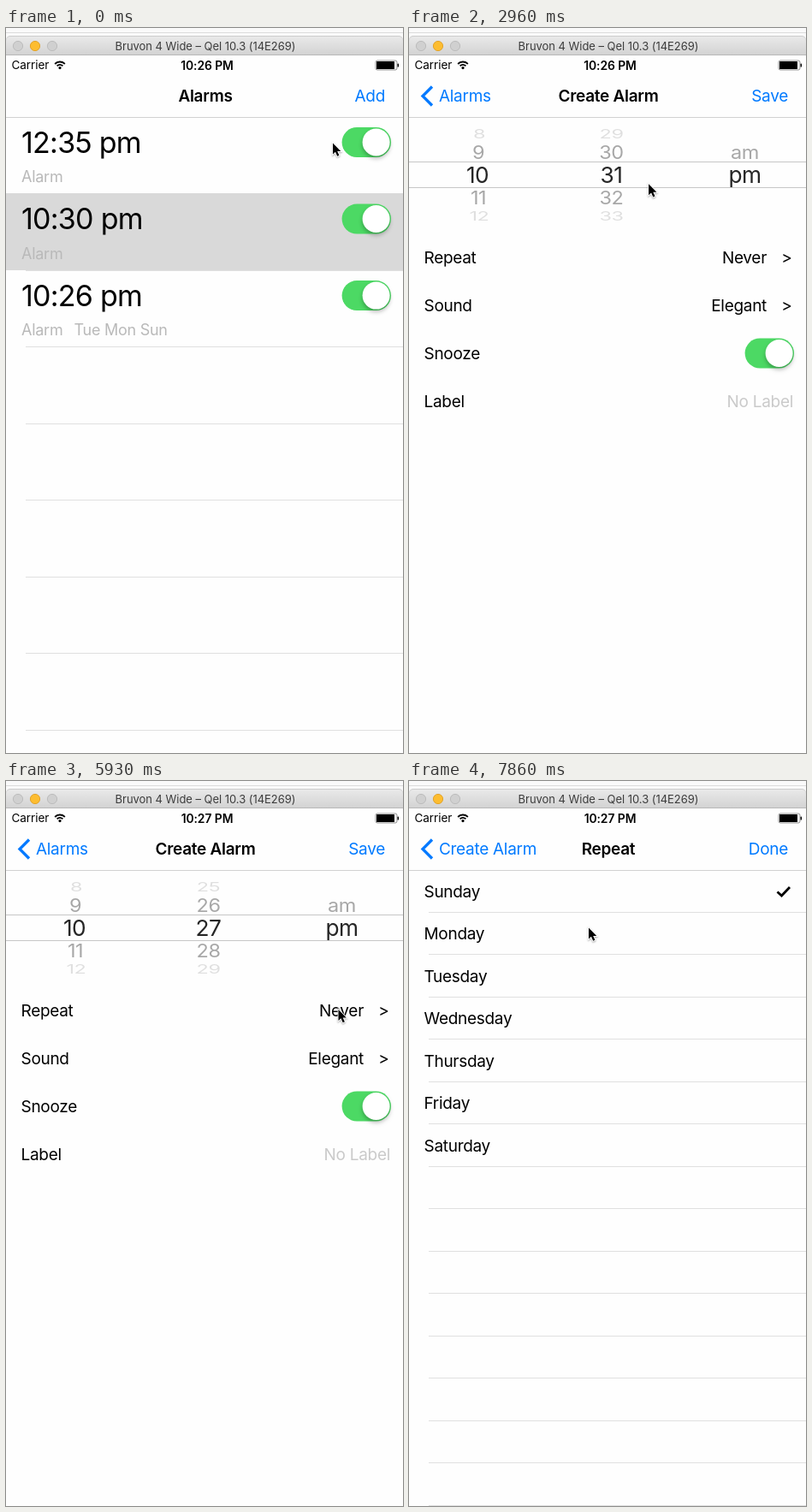
Recreate the animation shown at these times as an HTML page with a canvas. Size 464 px wide and 847 px high, loop 8 s.

```html
<!DOCTYPE html>
<html lang="en">
<head>
<meta charset="utf-8">
<title>Alarms</title>
<style>
html, body { margin: 0; width: 100%; height: 100%; overflow: hidden; background: #fefefe; }
canvas { display: block; width: 464px; height: 847px; }
</style>
</head>
<body>
<canvas id="stage"></canvas>
<script>
const W = 464, H = 847, LOOP = 8000, STEP = 148.2, LAST = 53;
const TOP = 104, BLUE = '#007aff', PAPER = '#fefefe', LINE = '#e0e0e0', PRESSED = '#d9d9d9';
const PUSH_FORM = 1895, PUSH_DAYS = 6334, NAV_MS = 350, PUSH_MS = 450;
const DRAG_START = 3265, DRAG_END = 4550, GRAB_Y = 200.3;
const PRESS_ADD = 1625, PRESS_DAY = 7400, CHECK_DAY = 7550;
const DAYS = ['Sunday', 'Monday', 'Tuesday', 'Wednesday', 'Thursday', 'Friday', 'Saturday'];
const NAV = {
  list: { title: 'Alarms', right: 'Add' },
  form: { title: 'Create Alarm', back: 'Alarms', right: 'Save' },
  days: { title: 'Repeat', back: 'Create Alarm', right: 'Done' }
};
// pointer path: time, x, y
const PATH = [
  [0, 381.5, 134], [600, 381.5, 134], [740, 378, 132], [1040, 378, 132], [1630, 427, 88],
  [2225, 427, 88], [3110, 250.5, GRAB_Y], [DRAG_START, 250.5, GRAB_Y], [4001, 250.5, 275],
  [4300, 250.5, 316], [DRAG_END, 250.5, 316], [5300, 413, 270],
  [5640, 391, 254], [5928, 388, 266.5], [6800, 388, 266.5], [7270, 212, 126],
  [7450, 212, 126], [7854, 209.5, 171]
];

const canvas = document.getElementById('stage');
const ctx = canvas.getContext('2d');
const dpr = window.devicePixelRatio || 1;
canvas.width = W * dpr;
canvas.height = H * dpr;

const clamp = (v, a = 0, b = 1) => Math.min(b, Math.max(a, v));

function group(draw) {
  ctx.save();
  draw();
  ctx.restore();
}

function rect(x, y, w, h, color) {
  ctx.fillStyle = color;
  ctx.fillRect(x, y, w, h);
}

function rounded(x, y, w, h, r, color) {
  ctx.beginPath();
  ctx.roundRect(x, y, w, h, r);
  ctx.fillStyle = color;
  ctx.fill();
}

function disc(x, y, r, color, edge) {
  ctx.beginPath();
  ctx.arc(x, y, r, 0, 7);
  ctx.fillStyle = color;
  ctx.fill();
  if (edge) {
    ctx.strokeStyle = edge;
    ctx.lineWidth = 1;
    ctx.stroke();
  }
}

function stroke(points, width, color) {
  ctx.beginPath();
  for (const [x, y] of points) ctx.lineTo(x, y);
  ctx.lineWidth = width;
  ctx.strokeStyle = color;
  ctx.stroke();
}

// text centred on its cap height at y; tracking tightens as the size grows
function text(str, x, y, { size = 19, color = '#000', weight = 400, align = 'left', alpha = 1 } = {}) {
  if (alpha <= 0) return;
  const track = -0.0223 + 0.185 * Math.exp(-0.1745 * size);
  ctx.font = `${weight} ${size}px Inter, Roboto, sans-serif`;
  ctx.letterSpacing = `${(track * size).toFixed(3)}px`;
  ctx.textAlign = align;
  ctx.fillStyle = color;
  ctx.globalAlpha = alpha;
  ctx.fillText(str, x, y + size * 0.364);
  ctx.globalAlpha = 1;
}

function toggle(y) {
  rounded(392.6, y - 17.5, 57.4, 35, 17.5, '#4cd964');
  group(() => {
    ctx.shadowColor = 'rgba(0,0,0,.28)';
    ctx.shadowBlur = 5 * dpr;
    ctx.shadowOffsetY = 3 * dpr;
    disc(432.6, y, 16, '#fff');
  });
}

function listScreen() {
  const pitch = 89.55;
  const alarms = ['12:35 pm', '10:30 pm', '10:26 pm'];
  rect(0, TOP, W, H, PAPER);
  for (let i = 1; i <= 8; i++) rect(23, Math.round(TOP - 0.4 + i * pitch), W, 1, LINE);
  rect(0, 193, W, 90, PRESSED);
  alarms.forEach((label, i) => {
    const y = TOP + i * pitch;
    text(label, 18, y + 29.5, { size: 34 });
    text('Alarm', 18, y + 69.5, { size: 18, color: '#b9b9b9' });
    toggle(y + 29.5);
  });
  text('Tue Mon Sun', 79.5, TOP + 2 * pitch + 69.5, { size: 18, color: '#b9b9b9' });
}

// one column of the picker drum
function wheel(x, value, label, size, color, fade, nudge) {
  const radius = 62.7, angle = 25 * Math.PI / 180;
  for (let n = Math.ceil(value - 2.6); n <= value + 2.6; n++) {
    const str = label(n), a = (n - value) * angle;
    if (!str) continue;
    const c = Math.cos(a);
    group(() => {
      ctx.translate(x + nudge * Math.abs(n - value), 171.5 + radius * Math.sin(a));
      ctx.scale(1, c);
      text(str, 0, 0, { size, color, align: 'center', alpha: fade ? 0.46 * c ** 3 : 1 });
    });
  }
}

function picker(minute) {
  const hours = n => String((n + 11) % 12 + 1);
  const minutes = n => String((n + 60) % 60).padStart(2, '0');
  const half = n => ['am', 'pm'][n];
  const bands = [[110, 46, 23.5, '#000', true], [157, 29, 26.3, '#262626', false], [187, 45, 23.5, '#000', true]];
  for (const [y, h, size, color, fade] of bands) group(() => {
    ctx.beginPath();
    ctx.rect(0, y, W, h);
    ctx.clip();
    wheel(80, 10, hours, size, color, fade, 1);
    wheel(236.5, minute, minutes, size, color, fade, 0);
    wheel(392.5, 1, half, size, color, fade, 0);
  });
  rect(0, 156, W, 1, '#c6c6c6');
  rect(0, 186, W, 1, '#c6c6c6');
}

function formScreen(t) {
  rect(0, TOP, W, H, PAPER);
  const held = 31 - (pointer(t)[1] - GRAB_Y) / 27.4;
  picker(t < DRAG_START ? 31 : t < DRAG_END ? held : 27);
  ['Repeat', 'Sound', 'Snooze', 'Label'].forEach((s, i) => text(s, 17.5, 268 + i * 56));
  ['Never', 'Elegant'].forEach((s, i) => {
    text(s, 418, 268 + i * 56, { align: 'right' });
    text('>', 447.5, 268 + i * 56, { align: 'right' });
  });
  toggle(380);
  text('No Label', 449, 436, { align: 'right', color: '#cacaca' });
}

function daysScreen(t) {
  const pitch = 49.5;
  rect(0, TOP, W, H, PAPER);
  if (t > PRESS_DAY && t < CHECK_DAY) rect(0, TOP, W, pitch, PRESSED);
  for (let i = 1; i <= 15; i++) rect(23, Math.floor(TOP - 0.1 + i * pitch), W, 1, LINE);
  DAYS.forEach((s, i) => text(s, 17.5, 129 + i * pitch));
  if (t >= CHECK_DAY) stroke([[430.5, 129.5], [435.5, 134], [445, 124]], 2.8, '#000');
}

function chevron(alpha) {
  ctx.globalAlpha = alpha;
  stroke([[27, 68.5], [16, 79.5], [27, 90.5]], 3.3, BLUE);
  ctx.globalAlpha = 1;
}

const navTitle = (s, x, alpha) => text(s, x, 79.5, { weight: 600, align: 'center', alpha });
const navBack = (s, x, alpha) => s && text(s, x, 79.5, { color: BLUE, alpha });
const navRight = (s, alpha) => text(s, 443, 79.5, { color: BLUE, align: 'right', alpha });

function navBar(from, to, u, t) {
  rect(0, 32, W, TOP - 32, PAPER);
  rect(0, TOP, W, 1, '#d2d2d2');
  const dimAdd = from === NAV.list && t >= PRESS_ADD ? 0.24 : 1;
  if (!to) {
    if (from.back) chevron(1);
    navBack(from.back, 35, 1);
    navTitle(from.title, 233, 1);
    navRight(from.right, dimAdd);
    return;
  }
  const rest = (1 - u) ** 2, gone = 1 - 2.6 * u, come = clamp((u - 0.15) * 2.2);
  chevron(from.back ? 1 : 0.7 * u);
  navBack(from.back, 35 - 100 * u, gone);
  navTitle(from.title, 233 - 168 * u, gone);
  navBack(to.back, 35 + 118 * rest, 0.85 * clamp(come * 1.2));
  navTitle(to.title, 233 + 225 * rest, come);
  navRight(from.right, dimAdd * (1 - 2 * u));
  navRight(to.right, clamp(1.5 * u));
}

function chrome(t) {
  rect(0, 0, W, 32, '#fafafa');
  rect(0, 5, W, 1, '#dcdcdc');
  const shade = ctx.createLinearGradient(0, 10, 0, 32);
  shade.addColorStop(0, '#e9e9e9');
  shade.addColorStop(1, '#d2d2d2');
  rounded(0, 9, W, 23, [5, 5, 0, 0], '#cdcdcd');
  rounded(0, 10, W, 22, [5, 5, 0, 0], shade);
  rect(0, 31, W, 1, '#b8b8b8');
  disc(14, 21, 5.6, '#d0d0d0', '#bcbcbc');
  disc(34, 21, 5.6, '#fdbd30', '#e2a32a');
  disc(54, 21, 5.6, '#d0d0d0', '#bcbcbc');
  text('Bruvon 4 Wide – Qel 10.3 (14E269)', 233, 21, { size: 13, color: '#3c3c3c', align: 'center' });

  text('Carrier', 6.5, 43.5, { size: 13.5 });
  ctx.strokeStyle = '#000';
  ctx.lineWidth = 1.9;
  for (const r of [4.6, 8]) {
    ctx.beginPath();
    ctx.arc(63, 47.5, r, -Math.PI * 0.76, -Math.PI * 0.24);
    ctx.stroke();
  }
  disc(63, 46.6, 1.6, '#000');
  text(t < 3480 ? '10:26 PM' : '10:27 PM', 235, 43.5, { size: 13.9, weight: 600, align: 'center' });
  ctx.lineWidth = 0.8;
  ctx.strokeStyle = '#777';
  ctx.beginPath();
  ctx.roundRect(432, 38, 25, 11, 2);
  ctx.stroke();
  rounded(433, 39, 21, 9, 0.5, '#000');
  rounded(457.6, 41.6, 1.4, 4, 0.7, '#000');
}

function pointer(t) {
  let i = 1;
  while (i < PATH.length - 1 && PATH[i][0] < t) i++;
  const [t0, x0, y0] = PATH[i - 1], [t1, x1, y1] = PATH[i];
  const u = clamp((t - t0) / (t1 - t0));
  return [x0 + (x1 - x0) * u, y0 + (y1 - y0) * u];
}

function arrow(t) {
  const [x, y] = pointer(t);
  group(() => {
    ctx.translate(x, y);
    ctx.beginPath();
    for (const p of [[0.5, 0.5], [0.5, 13.5], [3.5, 10.8], [5.7, 15.8], [7.9, 14.8], [5.7, 10], [9.8, 10]]) ctx.lineTo(...p);
    ctx.closePath();
    ctx.shadowColor = 'rgba(0,0,0,.35)';
    ctx.shadowBlur = 2 * dpr;
    ctx.shadowOffsetY = dpr;
    ctx.strokeStyle = '#fff';
    ctx.lineWidth = 1.8;
    ctx.stroke();
    ctx.shadowColor = 'transparent';
    ctx.fillStyle = '#000';
    ctx.fill();
  });
}

// critically damped slide with the old screen trailing behind
function push(oldScreen, newScreen, ms, t) {
  const k = 0.0178 * ms, left = (1 + k) * Math.exp(-k), done = 1 - left, x = Math.round(W * left);
  group(() => {
    ctx.translate(Math.round(-0.3 * W * done), 0);
    oldScreen(t);
  });
  rect(0, TOP, x, H, `rgba(0,0,0,${0.1 * done})`);
  const glow = ctx.createLinearGradient(x - 9, 0, x, 0);
  glow.addColorStop(0, 'rgba(0,0,0,0)');
  glow.addColorStop(1, `rgba(0,0,0,${0.04 + 0.12 * left})`);
  rect(x - 9, TOP, 9, H, glow);
  group(() => {
    ctx.translate(x, 0);
    newScreen(t);
  });
}

function scene(t) {
  const stages = [
    [0, listScreen, NAV.list],
    [PUSH_FORM, formScreen, NAV.form],
    [PUSH_DAYS, daysScreen, NAV.days]
  ];
  const i = t >= PUSH_DAYS ? 2 : t >= PUSH_FORM ? 1 : 0;
  const [start, screen, nav] = stages[i], ms = t - start;
  if (i && ms < PUSH_MS) {
    const [, before, navBefore] = stages[i - 1];
    push(before, screen, ms, t);
    navBar(navBefore, nav, clamp(ms / NAV_MS), t);
  } else {
    screen(t);
    navBar(nav, null, 0, t);
  }
}

function frame(now) {
  const step = Math.min(LAST, Math.floor((now % LOOP + 8) / STEP));
  const t = step * STEP;
  ctx.setTransform(dpr, 0, 0, dpr, 0, 0);
  rect(0, 0, W, H, PAPER);
  scene(t);
  chrome(t);
  arrow(t);
  requestAnimationFrame(frame);
}
requestAnimationFrame(frame);
</script>
</body>
</html>
```
